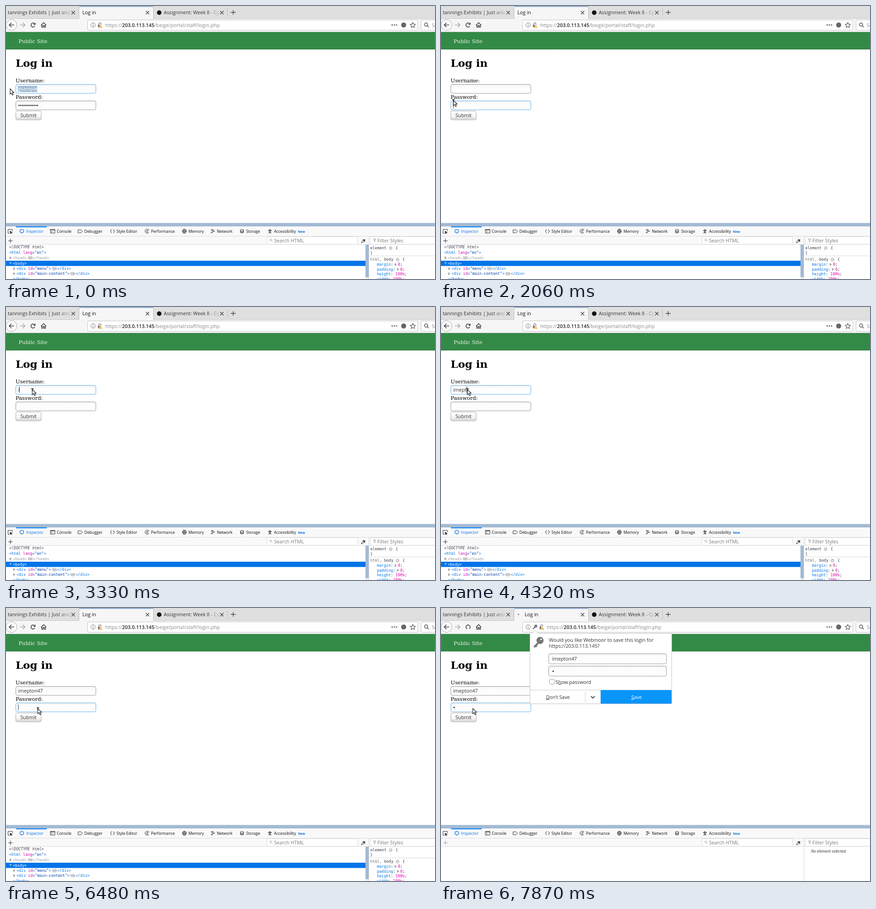
Write an HTML page that moves like this. It is 938 px wide and 597 px high and loops after 8000 ms.

```html
<!DOCTYPE html>
<html lang="en">
<head>
<meta charset="utf-8">
<title>Log in</title>
<style>
html, body { margin: 0; width: 100%; height: 100%; overflow: hidden; background: #fff; }
svg { position: absolute; left: 0; top: 0; }
text, .typed { font: 10.7px "Open Sans", "Noto Sans", sans-serif; fill: #333; white-space: pre; }
.serif text { font: 11.5px "DejaVu Serif", serif; fill: #000; }
.serif .h1 { font-size: 23px; font-weight: 700; }
.code text { font: 8.4px "DejaVu Sans Mono", monospace; fill: #0074e8; }
.tools text { font-size: 8.6px; fill: #0c0c0d; }
.code .dark { fill: #393f4c; }
.code .dim, .code .dim text { fill: #a0a0a8; }
.code .white { fill: #fff; }
.n { fill: #dd00a9; }
.v { fill: #003eaa; }
.mid { text-anchor: middle; }
.line { fill: none; stroke: #444; stroke-width: 1.3; }
.thin { fill: none; stroke: #333; stroke-width: 1; }
.field { fill: url(#inset); stroke: #999; }

/* one shared 8 s clock, every change is a hard step */
.a, .typed { animation: 8s step-end infinite; }
.before { animation-name: before; }
.after { animation-name: after; }
.user { animation-name: user; }
.pass { animation-name: pass; }
.picked { animation-name: picked; }
.dots { animation-name: dots; }
.part { animation-name: part; }
.all { animation-name: all; }
.dot { animation-name: dot; }
.pcaret { animation-name: pcaret; }
.pointer { animation-name: pointer; }
.beam { animation-name: beam; }
.title { animation-name: title; }
.url { animation-name: url; }
.plus { animation-name: plus; }
.typed {
  position: absolute; left: 26.5px; top: 174px; height: 14px; line-height: 14px;
  overflow: hidden; color: #333; border-right: 1px solid transparent;
  animation-name: type, caret;
}

@keyframes before { 0% { visibility: visible } 98.375%, 100% { visibility: hidden } }
@keyframes after { 0% { visibility: hidden } 98.375%, 100% { visibility: visible } }
@keyframes user {
  0%, 31.5% { stroke: #62aee8 }
  11.875%, 81%, 100% { stroke: #999 }
}
@keyframes pass {
  0%, 31.5% { stroke: #999 }
  11.875%, 81%, 100% { stroke: #62aee8 }
}
@keyframes picked { 0% { visibility: visible } 3.5%, 100% { visibility: hidden } }
@keyframes dots { 0% { visibility: visible } 25.75%, 100% { visibility: hidden } }
@keyframes part { 0%, 15.375%, 100% { visibility: hidden } 13.75% { visibility: visible } }
@keyframes all { 0%, 25.75%, 100% { visibility: hidden } 15.375% { visibility: visible } }
@keyframes dot { 0% { visibility: hidden } 93.125%, 100% { visibility: visible } }
@keyframes pcaret {
  0%, 13.75%, 31.5% { visibility: hidden; transform: none }
  11.875% { visibility: visible; transform: translateX(43px) }
  25.75%, 81% { visibility: visible; transform: none }
  93.125% { visibility: visible; transform: translateX(3.5px) }
  96.625%, 100% { visibility: hidden; transform: none }
}
@keyframes type {
  0% { width: 0 }
  41.625% { width: 2.9px }
  45.125% { width: 12.7px }
  47% { width: 18.7px }
  50.5% { width: 25.2px }
  54% { width: 29px }
  57.125% { width: 35.5px }
  60.25% { width: 42px }
  65.625% { width: 48.1px }
  67.5%, 100% { width: 54.4px }
}
@keyframes caret {
  0%, 11.875%, 76.125%, 100% { border-color: transparent }
  3.5%, 31.5% { border-color: #333 }
}
@keyframes pointer {
  0% { transform: translate(9px, 181px) }
  3.5% { transform: translate(14px, 187px) }
  5% { transform: translate(23px, 190px) }
  6.875% { transform: translate(68px, 211px) }
  8.375% { transform: translate(91px, 219px) }
  11.875% { transform: translate(62.5px, 219px) }
  13.75% { transform: translate(43px, 216px) }
  15.375% { transform: translate(18px, 213px) }
  17.25% { transform: translate(17px, 213px) }
  25.75% { transform: translate(27px, 206px) }
  27.625% { transform: translate(54px, 186px) }
  29.625% { transform: translate(57.5px, 180px) }
  76.125% { transform: translate(64px, 202px) }
  77.625%, 100% { transform: translate(69.5px, 219.5px) }
}
@keyframes beam { 0%, 98.375%, 100% { visibility: hidden } 11.875% { visibility: visible } }
@keyframes title { 0% { transform: none } 98.375%, 100% { transform: translateX(16px) } }
@keyframes url { 0% { transform: none } 98.375%, 100% { transform: translateX(14.5px) } }
@keyframes plus { 0% { stroke: #333 } 98.375%, 100% { stroke: #999 } }
</style>
</head>
<body>
<svg width="938" height="597" viewBox="0 0 938 597">
  <defs>
    <linearGradient id="inset" x2="0" y2="1">
      <stop stop-color="#f0f0f0"/><stop offset=".25" stop-color="#fcfcfc"/><stop offset="1" stop-color="#fefefe"/>
    </linearGradient>
    <linearGradient id="btn" x2="0" y2="1">
      <stop stop-color="#fff"/><stop offset=".7" stop-color="#f3f3f3"/><stop offset=".8" stop-color="#dcdcdc"/><stop offset="1" stop-color="#e2e2e2"/>
    </linearGradient>
    <linearGradient id="fade1" gradientUnits="userSpaceOnUse" x1="112" x2="143">
      <stop stop-color="#333"/><stop offset="1" stop-color="#333" stop-opacity=".15"/>
    </linearGradient>
    <linearGradient id="fade2" gradientUnits="userSpaceOnUse" x1="438" x2="468">
      <stop stop-color="#333"/><stop offset="1" stop-color="#333" stop-opacity=".1"/>
    </linearGradient>
    <path id="x" d="M-3.7-3.7 3.7 3.7M3.7-3.7-3.7 3.7" class="line"/>
    <path id="fold" d="M-1.7-3 2-.2-1.7 2.6Z" fill="#aaa" stroke="#888" stroke-width=".6"/>
    <g id="more">
      <rect x=".5" y="-6" width="9" height="5.6" rx="1.2" fill="#eee" stroke="#999" stroke-width=".8"/>
      <path d="M2.3-3.2H8" stroke="#444" stroke-width="1.2" stroke-dasharray="1.2 1"/>
    </g>
    <g id="gear" fill="none" stroke="#888">
      <circle r="2.3" stroke-width=".9"/><circle r="3.5" stroke-width="1" stroke-dasharray="1.2 1.55"/>
    </g>
    <g id="lens" class="line"><circle r="3.6"/><path d="M2.7 2.7 6 6"/></g>
  </defs>

  <!-- tabs -->
  <path d="M0 0H938V28H0Z" fill="#dfdfdf"/>
  <path d="M0 27.5H938" stroke="#c6c6c6"/>
  <path d="M160 0H322V28H160Z" fill="#f6f6f7"/>
  <path d="M160 1H322" stroke="#8fadd0" stroke-width="2"/>
  <path d="M159.5 2V27M322.5 2V27M484.5 5V24" stroke="#b9b9b9"/>
  <text x="4" y="18" style="fill:url(#fade1)">tannings Exhibits | Just ano</text>
  <text x="167" y="18" class="a title" style="fill:#111">Log in</text>
  <circle cx="169.500" cy="14" r="1.300" fill="#555" class="a after"/>
  <circle cx="335" cy="14.500" r="5" fill="#111"/>
  <text x="345" y="18" style="fill:url(#fade2)">Assignment: Week 8 - Cy</text>
  <use href="#x" x="147" y="14.500"/><use href="#x" x="309.500" y="14.500"/><use href="#x" x="472" y="14.500"/>
  <path d="M491.500 14H502M496.700 9V19" class="line"/>

  <!-- toolbar -->
  <path d="M0 28H938V57H0Z" fill="#f6f6f7"/>
  <path d="M0 56.500H938" stroke="#d0d0d0"/>
  <circle cx="12" cy="41.500" r="11.800" fill="#fcfcfc" stroke="#aaa"/>
  <path d="M18 41.500H7.500M12 36.500 7 41.500 12 46.500" class="line" style="stroke-width:1.600"/>
  <path d="M30.500 41.500H41M36.500 36.500 41.500 41.500 36.500 46.500" class="line" style="stroke:#aaa;stroke-width:1.600"/>
  <g class="a before">
    <path d="M63 43.500A4.400 4.400 0 1 1 62.300 38.600" class="line" style="stroke-width:1.700"/>
    <path d="M64.500 36V41H59.500Z" fill="#444"/>
  </g>
  <path d="M57 45.700A4.600 4.600 0 1 1 62 45.400" class="line a after" style="stroke-width:1.700"/>
  <path d="M76.500 42 82.300 36.300 88 42M78.300 41V46.500H81V42.500H83.600V46.500H86.300V41" class="line" style="stroke-width:1.600"/>
  <rect x="178.500" y="30.500" width="722" height="22.500" rx="2" fill="#fff" stroke="#c4c4c4"/>
  <rect x="907.500" y="30.500" width="40" height="22.500" rx="2" fill="#fff" stroke="#c4c4c4"/>
  <g class="thin" style="stroke:#777"><circle cx="190.500" cy="41.500" r="4.900"/><path d="M190.500 41V44.500M190.500 38.500V39.700" stroke-width="1.300"/></g>
  <g class="a after" fill="none" stroke="#666">
    <path d="M205.500 41.500 201 46" stroke-width="2"/><circle cx="207.200" cy="39.700" r="2" stroke-width="2.300"/>
  </g>
  <g class="a url">
    <path d="M202.500 41V39.500A2.600 2.600 0 0 1 207.700 39.500V41" class="line" style="stroke:#777"/>
    <path d="M201 41H208.500V46.500H201Z" fill="#777"/>
    <path d="M207 40 211.500 48H202.500Z" fill="#f6b13c" stroke="#fff" stroke-width=".6"/>
    <path d="M207 42.500V45M207 46V47" stroke="#fff"/>
    <text x="217" y="45.500" style="font-size:10.800px;fill:#888">https://<tspan font-weight="600" fill="#222">203.0.113.145</tspan>/beige/portal/staff/login.php</text>
  </g>
  <path d="M843 41.500H856.500" stroke="#555" stroke-width="2.600" stroke-dasharray="2.600 2.200"/>
  <circle cx="869.500" cy="41.500" r="5.500" fill="#666"/>
  <path d="m889.500 36 1.700 3.600 4 .5-2.900 2.800.7 4-3.500-1.900-3.500 1.900.7-4-2.900-2.800 4-.5Z" class="line" style="stroke:#555;stroke-width:1.200"/>
  <use href="#lens" x="918.500" y="40.500"/>
  <text x="931" y="45.500" style="fill:#888">Se</text>

  <!-- page -->
  <path d="M0 57H938V95H0Z" fill="#338a46"/>
  <path d="M0 94.500H938" stroke="#2c7a3c"/>
  <g class="serif">
    <text x="27.500" y="81" style="fill:#eef5ee">Public Site</text>
    <text x="21" y="133" class="h1">Log in</text>
    <text x="21" y="167">Username:</text>
    <text x="21" y="203">Password:</text>
  </g>
  <rect x="21.500" y="171.500" width="175" height="19.500" rx="3.500" class="field a user"/>
  <rect x="21.500" y="207.500" width="175" height="19.500" rx="3.500" class="field a pass"/>
  <g class="a picked">
    <path d="M26 175H68V188H26Z" fill="#9db7d3"/>
    <text x="26.500" y="185" style="fill:#fff">gsample</text>
  </g>
  <path d="M28.500 217.500H70" stroke="#333" stroke-width="2.800" stroke-linecap="round" stroke-dasharray="0 3.680" class="a dots"/>
  <g class="a part">
    <path d="M44 211H70V224H44Z" fill="#9db7d3"/>
    <path d="M46.900 217.500H70" stroke="#fff" stroke-width="2.800" stroke-linecap="round" stroke-dasharray="0 3.680"/>
  </g>
  <g class="a all">
    <path d="M26 211H70V224H26Z" fill="#9db7d3"/>
    <path d="M28.500 217.500H70" stroke="#fff" stroke-width="2.800" stroke-linecap="round" stroke-dasharray="0 3.680"/>
  </g>
  <circle cx="28.800" cy="217.500" r="1.600" fill="#333" class="a dot"/>
  <path d="M27 211V224" stroke="#333" class="a pcaret"/>
  <rect x="21.500" y="229.500" width="55.500" height="19.500" rx="3" fill="url(#btn)" stroke="#aaa"/>
  <text x="49.200" y="243" class="mid">Submit</text>

  <!-- developer tools -->
  <path d="M0 474.500H938V482H0Z" fill="#a2bad3"/>
  <path d="M0 482H938V522H0Z" fill="#f9f9fa"/>
  <path d="M0 503.500H938M0 521.500H938M793.500 504V597" stroke="#dcdcde"/>
  <path d="M22 483H89" stroke="#0a84ff" stroke-width="2"/>
  <g class="thin">
    <path d="M8 497H4.500V488.500H14V492"/><path d="M8 491.500 15 495 11.800 495.700 14 498.500 11 497 9.500 498.500Z" fill="#333" stroke="none"/>
    <g style="stroke:#0a6fe0"><rect x="31" y="489" width="7" height="6.500"/><path d="M34.500 487V489M34.500 495.500V498M29 492.300H31M38 492.300H40"/></g>
    <path d="M97 488.500H107V496.500H97ZM97 490H107M99 492 101 493.500 99 495"/>
    <path d="M157.500 489.500H164L167.500 492.700 164 496H157.500Z"/>
    <path d="M231 488.500Q229.500 488.500 229.700 490.500T228 492.500Q229.700 492.700 229.700 494.500T231 496.500M234.500 488.500Q236 488.500 235.800 490.500T237.500 492.500Q235.800 492.700 235.800 494.500T234.500 496.500"/>
    <path d="M312 489.500A4.500 4.500 0 1 0 312.500 494.500M310.500 491.500A2 2 0 1 0 310.500 494M308.500 492.500 313 488.500"/>
    <path d="M388 488.500H392V496.500H388ZM386 490V495M394 490V495M390 490.500V494.500" stroke-width="1.300"/>
    <path d="M448 489.500H454M450 492.500H456.500M448 495.500H452" stroke-width="1.300"/>
    <path d="M512.500 489.500Q516 487.500 519.500 489.500V495.500Q516 497.500 512.500 495.500ZM512.500 491.500Q516 493.500 519.500 491.500M512.500 493.700Q516 495.700 519.500 493.700"/>
    <path d="M573 491.300H581M577 491.500V494M574.500 497 577 493.500 579.500 497" stroke-width="1.400"/><circle cx="577" cy="489.300" r="1"/>
  </g>
  <g class="tools">
    <text x="44" y="495.500" style="fill:#0a6fe0">Inspector</text>
    <text x="111" y="495.500">Console</text>
    <text x="171.500" y="495.500">Debugger</text>
    <text x="241.500" y="495.500">Style Editor</text>
    <text x="317" y="495.500">Performance</text>
    <text x="399" y="495.500">Memory</text>
    <text x="461" y="495.500">Network</text>
    <text x="525" y="495.500">Storage</text>
    <text x="586" y="495.500">Accessibility</text>
    <text x="638.500" y="495.500" style="font-size:6.900px;font-weight:700;fill:#0a6fe0">New</text>
  </g>
  <path d="M5 513.500H14.500M9.700 508.700V518.300" class="thin a plus"/>
  <rect x="570.500" y="504.500" width="198" height="16.500" fill="#fff" stroke="#dcdcde"/>
  <rect x="796.500" y="504.500" width="150" height="16.500" fill="#fff" stroke="#dcdcde"/>
  <use href="#lens" transform="translate(579 511.500) scale(.6)" opacity=".6"/>
  <text x="586" y="516.500" style="fill:#777">Search HTML</text>
  <path d="M777 518 778 515 782 511 784 513 780 517Z" class="thin"/><path d="M780.500 510.500 785 515M783 512.500 785 510.500" stroke="#333" stroke-width="2"/>
  <path d="M803 509.500H809L806.700 512.500V516L805.300 515V512.500Z" class="thin" style="stroke:#999"/>
  <text x="812" y="516.500" style="fill:#777">Filter Styles</text>
  <path d="M0 522H793V597H0ZM794 522H938V597H794Z" fill="#fff"/>

  <g class="code a before">
    <path d="M0 557H786V568.500H0Z" fill="#0074e8"/>
    <path d="M786 522H793V597H786Z" fill="#eee"/>
    <path d="M786 522H793V593H786Z" fill="#a2bad3"/>
    <text x="7" y="530" class="dark" font-style="italic" style="font-style:italic">&lt;!DOCTYPE html&gt;</text>
    <text x="7" y="542">&lt;html <tspan class="n">lang</tspan>=<tspan class="v">"en"</tspan>&gt;</text>
    <g class="dim">
      <text x="15" y="554">&lt;head&gt;</text><text x="59" y="554">&lt;/head&gt;</text>
    </g>
    <use href="#fold" x="10" y="551"/><use href="#more" x="48" y="554"/>
    <path d="M7 560.500H13L10 564.500Z" fill="#8cc2f5"/>
    <text x="15" y="565.500" class="white">&lt;body&gt;</text>
    <use href="#fold" x="18" y="574.500"/><use href="#more" x="101" y="577.500"/>
    <text x="23" y="577">&lt;div <tspan class="n">id</tspan>=<tspan class="v">"menu"</tspan>&gt;</text><text x="112" y="577">&lt;/div&gt;</text>
    <use href="#fold" x="18" y="585.500"/><use href="#more" x="141" y="588.500"/>
    <text x="23" y="588">&lt;div <tspan class="n">id</tspan>=<tspan class="v">"main-content"</tspan>&gt;</text><text x="152.500" y="588">&lt;/div&gt;</text>
    <text x="15" y="600">&lt;/body&gt;</text>

    <path d="M794 546.500H938" stroke="#dcdcde"/>
    <text x="796.500" y="532" class="dark">element</text><use href="#gear" x="841" y="529.500"/>
    <text x="852" y="532" class="dark">{</text><text x="796.500" y="543" class="dark">}</text>
    <text x="796.500" y="557" class="dark"><tspan fill="#777">html,</tspan> body</text><use href="#gear" x="856" y="554.500"/>
    <text x="867" y="557" class="dark">{</text>
    <text x="811" y="568">margin<tspan class="dark">:</tspan></text><use href="#fold" x="852" y="565.500"/>
    <text x="857" y="568" class="n" style="fill:#dd00a9">0<tspan class="dark">;</tspan></text>
    <text x="811" y="578.500">padding<tspan class="dark">:</tspan></text><use href="#fold" x="857" y="576"/>
    <text x="862" y="578.500" style="fill:#dd00a9">0<tspan class="dark">;</tspan></text>
    <text x="811" y="589">height<tspan class="dark">:</tspan> <tspan class="n">100%</tspan><tspan class="dark">;</tspan></text>
    <text x="811" y="599.500">width<tspan class="dark">:</tspan> <tspan class="n">100%</tspan><tspan class="dark">;</tspan></text>
  </g>
  <g class="tools a after"><text x="809" y="535" style="font-style:italic;fill:#333">No element selected.</text></g>
</svg>

<div class="typed">imepton47</div>

<svg width="938" height="597" viewBox="0 0 938 597">
  <!-- save prompt -->
  <g class="a after">
    <path d="M194.500 55.500H198L205.500 49 213 55.500H504.500V209.500H194.500Z" fill="#fff" stroke="#c4c4c4"/>
    <path d="M212 77 203.500 85.500M207 82 209.500 84.500" stroke="#777" stroke-width="4"/>
    <circle cx="216.500" cy="71" r="5.300" fill="#fff" stroke="#777" stroke-width="5"/>
    <circle cx="216" cy="71.500" r="4" fill="#777"/><circle cx="219" cy="68.500" r="1.800" fill="#fff"/>
    <text x="236" y="73.500">Would you like Webmoor to save this login for</text>
    <text x="236" y="87">https://203.0.113.145?</text>
    <rect x="235.500" y="100" width="257.500" height="22" rx="3.500" class="field"/>
    <rect x="235.500" y="127" width="257.500" height="22" rx="3.500" class="field"/>
    <text x="243" y="115">imepton47</text>
    <circle cx="245.300" cy="138.300" r="1.600" fill="#333"/>
    <rect x="237.500" y="156" width="10.500" height="10.500" rx="2" fill="#fff" stroke="#999"/>
    <text x="250.500" y="165.500">S<tspan text-decoration="underline">h</tspan>ow password</text>
    <path d="M195 179.500H504M315.500 183V206" stroke="#ccc"/>
    <path d="M328 193 332 197 336 193" class="line" style="stroke-width:1.800"/>
    <path d="M349 179.500H504V209H349Z" fill="#0a95fb"/>
    <text x="255.500" y="198.500" class="mid"><tspan text-decoration="underline">D</tspan>on’t Save</text>
    <text x="427.500" y="198.500" class="mid" style="fill:#fff"><tspan text-decoration="underline">S</tspan>ave</text>
  </g>

  <g class="a pointer">
    <path d="M0 0V11.700L2.700 9.300 4.700 13.800 6.800 12.900 4.900 8.500H8.300Z" fill="#fff" stroke="#111" stroke-width="1.100"/>
    <path d="M-2.500-1.500H3M.3-1.500V4.500" fill="none" stroke="#222" stroke-width="1.400" class="a beam"/>
  </g>
</svg>
</body>
</html>
```
